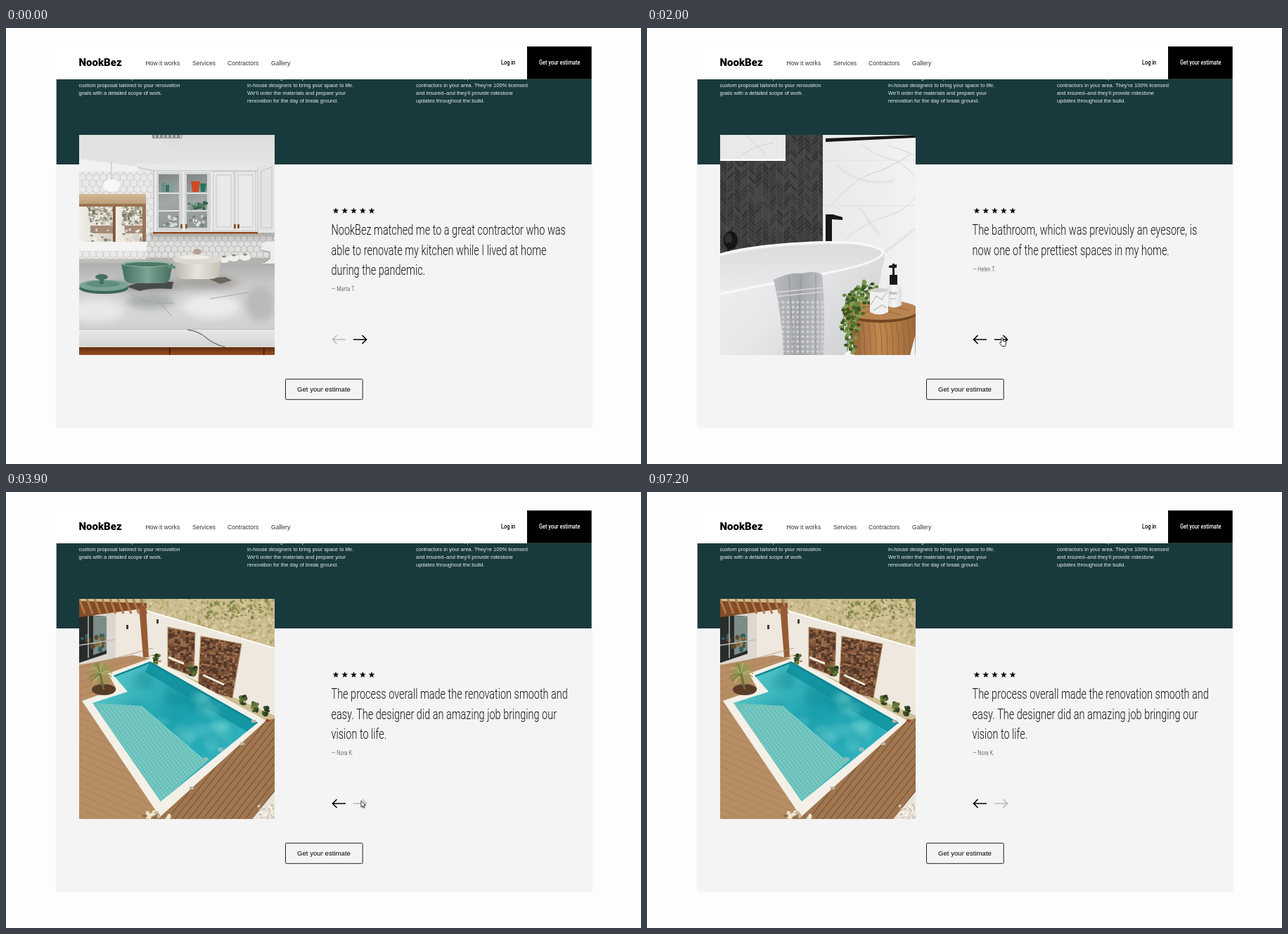
These frames come from a looping animation (903 by 620 pixels, 7.3 s). An HTML page with a canvas:

```html
<!DOCTYPE html>
<html lang="en">
<head>
<meta charset="utf-8">
<title>Testimonials</title>
<style>
html, body { margin: 0; width: 100%; height: 100%; overflow: hidden; background: #fdfdfd; }
canvas { display: block; }
</style>
</head>
<body>
<canvas id="stage" width="903" height="620"></canvas>
<script>
const stage = document.getElementById('stage');
const screen = stage.getContext('2d');
let ctx = screen;

const LOOP = 7300, STEP = 100;
const CLICKS = [1120, 2875], SLIDE = 500, SLIDE_FROM = 220;
const ENTER = { show: 100, start: 200, time: 450 };
const LEAVE = { start: 4700, time: 300 };
const PHOTO = { x: 104, y: 152, w: 278, h: 313 };
const SANS = '"Liberation Sans", Arial, sans-serif';
const NARROW = 'Roboto, "Open Sans", sans-serif';

const reviews = [
  { lines: ['NookBez matched me to a great contractor who was', 'able to renovate my kitchen while I lived at home', 'during the pandemic.'], by: '— Marta T.' },
  { lines: ['The bathroom, which was previously an eyesore, is', 'now one of the prettiest spaces in my home.'], by: '— Helen T.' },
  { lines: ['The process overall made the renovation smooth and', 'easy. The designer did an amazing job bringing our', 'vision to life.'], by: '— Nora K.' }
];

let seed = 1;
function rnd(a = 0, b = 1) {
  seed = (seed * 16807) % 2147483647;
  return a + (b - a) * seed / 2147483647;
}
function pick(list) { return list[Math.floor(rnd(0, list.length))]; }
function clamp(v) { return Math.max(0, Math.min(1, v)); }
function smooth(v) { return v * v * (3 - 2 * v); }

function box(color, x, y, w, h) {
  ctx.fillStyle = color;
  ctx.fillRect(x, y, w, h);
}
function shape(color, d) {
  ctx.fillStyle = color;
  ctx.fill(new Path2D(d));
}
function stroke(color, d, width = 1) {
  ctx.strokeStyle = color;
  ctx.lineWidth = width;
  ctx.stroke(new Path2D(d));
}
function oval(color, x, y, rx, ry = rx) {
  ctx.fillStyle = color;
  ctx.beginPath();
  ctx.ellipse(x, y, rx, ry, 0, 0, 7);
  ctx.fill();
}
function shade(x0, y0, x1, y1, ...colors) {
  const g = ctx.createLinearGradient(x0, y0, x1, y1);
  colors.forEach((c, i) => g.addColorStop(i / (colors.length - 1), c));
  return g;
}
function within(d, draw) {
  ctx.save();
  ctx.clip(new Path2D(d));
  draw();
  ctx.restore();
}
function blurred(radius, draw) {
  ctx.save();
  ctx.filter = `blur(${radius}px)`;
  draw();
  ctx.restore();
}
function specks(n, colors, x0, y0, x1, y1, size) {
  for (let i = 0; i < n; i++) oval(pick(colors), rnd(x0, x1), rnd(y0, y1), rnd(size / 2, size), rnd(size / 3, size));
}
function text(str, x, y, font, color, condense = 1) {
  ctx.save();
  ctx.translate(x, y);
  ctx.scale(condense, 1);
  ctx.font = font;
  ctx.fillStyle = color;
  ctx.fillText(str, 0, 0);
  ctx.restore();
}

function hexTiles(x0, y0, x1, y1, r, fill, line) {
  const w = r * Math.sqrt(3);
  within(`M${x0} ${y0}H${x1}V${y1}H${x0}Z`, () => {
    box(fill, x0, y0, x1 - x0, y1 - y0);
    for (let row = 0, y = y0; y < y1 + r; y += r * 1.5, row++)
      for (let x = x0 + (row % 2) * w / 2; x < x1 + w; x += w)
        stroke(line, `M${x} ${y - r}l${w / 2} ${r / 2}v${r}l${-w / 2} ${r / 2}l${-w / 2} ${-r / 2}v${-r}Z`, 0.7);
  });
}

function kitchen() {
  box('#ececea', 104, 152, 278, 313);
  box(shade(0, 152, 0, 205, '#dcdcdb', '#e8e8e7'), 104, 152, 278, 53);
  shape('#e2e2e0', 'M104 152H210L252 188L188 197L104 186Z');
  shape('#f1f1f0', 'M104 186L188 197V205H104Z');
  box('#8f908e', 208, 152, 42, 5);
  for (let x = 211; x < 250; x += 6) box('#cfd0ce', x, 152, 2, 4);
  hexTiles(104, 204, 210, 335, 5.6, '#e9e9e8', '#cbcccb');
  hexTiles(199, 291, 382, 330, 5.2, '#dfdfdd', '#b9bab8');
  box(shade(0, 291, 0, 306, 'rgba(110,100,92,.4)', 'rgba(110,100,92,0)'), 205, 291, 177, 15);

  oval('#f8f8f8', 150, 224, 12, 9);
  box('#cfcfce', 149, 190, 1.5, 26);
  box(shade(0, 236, 0, 251, '#d3b795', '#bb9c78'), 104, 236, 95, 15);
  box('#9c7350', 104, 250, 95, 56);
  [[104, 48], [156, 38]].forEach(([x, w]) => within(`M${x} 254h${w}v51h${-w}Z`, () => {
    box(shade(x, 0, x + w, 0, '#f1efe9', '#d4cec2'), x, 254, w, 51);
    specks(110, ['#8b8d76', '#6f735f', '#c9c5b6', '#f3f1ea', '#a79d8b'], x + w / 4, 252, x + w, 280, 2.4);
    box('#a88a78', x + w / 3, 281, w, 11);
    specks(24, ['#858b70', '#efece4', '#d7d1c4'], x + w / 4, 286, x + w, 304, 2.5);
  }));
  box('#7d5a3e', 152, 254, 3, 51);
  box('#f3f3f1', 104, 304, 96, 13);
  box(shade(0, 317, 0, 336, '#dad9d6', '#b7b5b1'), 104, 328, 100, 8);

  shape('#e9e9e9', 'M185 192L358 197V292H210V203L185 198Z');
  stroke('#bcbebe', 'M187 198L210 203H358', 1.2);
  box('#c9cbcb', 209, 203, 2, 89);
  [217, 257].forEach(x => {
    box('#d4d6d6', x - 3, 205, 37, 84);
    box(shade(x, 208, x + 30, 284, '#7f8685', '#a3a8a5', '#8c9390'), x, 208, 29, 76);
    [234, 259].forEach(y => box('#dfe1e0', x, y, 29, 2));
    specks(14, ['#c4c8c7', '#767f7d', '#dcdedd'], x + 4, 268, x + 26, 282, 3);
  });
  ['#5f918b', '#3f6f69', '#7aa09a'].forEach((c, i) => box(c, 221 + i * 6, 220 + i % 2 * 3, 5, 13 - i % 2 * 3));
  shape('#cf4a25', 'M263 218H276L274 233H265Z');
  shape('#23775f', 'M276 221H285L283 233H277Z');
  specks(24, ['#4d7a60', '#33624b', '#7d9c8a'], 260, 247, 284, 257, 3.4);
  [297, 328].forEach(x => {
    ctx.strokeStyle = '#c3c5c5';
    ctx.lineWidth = 1;
    ctx.strokeRect(x - 2, 204, 29, 84);
    ctx.strokeRect(x + 2, 209, 21, 74);
  });
  [248, 255, 324, 329].forEach(x => box('#8d5a32', x, 279, 3, 6));
  box('#8f4a22', 209, 290, 149, 2.5);
  shape('#e2e3e3', 'M358 198L382 190V290H358Z');
  stroke('#bfc2c2', 'M358 198V290M363 203L378 198V284H363Z');

  box('#b5b3af', 199, 327, 183, 9);
  [[324, 327], [340, 326], [310, 329]].forEach(([x, y]) => {
    oval('#f0eeea', x, y, 8, 5);
    oval('#8e8a84', x, y - 4, 3, 1.5);
  });
  shape('#ededec', 'M363 308Q367 302 382 304V335H364L374 328V318L364 316Z');
  stroke('#8f9090', 'M363 316L375 319V328L366 334', 1.2);

  box(shade(0, 335, 0, 428, '#aeaeae', '#cbcbcb', '#dadada', '#d0d0d0'), 104, 335, 278, 94);
  within('M104 335H382V428H104Z', () => blurred(6, () => {
    oval('#8f9492', 200, 366, 52, 8);
    oval('#9f9d99', 285, 362, 46, 8);
    oval('#a8adaa', 205, 388, 34, 11);
    oval('#e8e8e8', 128, 402, 40, 16);
    oval('#ececec', 292, 396, 40, 16);
    oval('#b9b9ba', 362, 392, 22, 26);
  }));
  shape('#6b675f', 'M286 356L312 354L321 359L305 364Z');
  shape('#484b4c', 'M172 368Q190 358 238 361L236 371Q205 369 190 374Z');
  shape(shade(238, 0, 306, 0, '#b9b3aa', '#e9e5de', '#c4beb4'), 'M238 331H306L303 351Q300 357 290 357H252Q242 357 241 350Z');
  oval('#dcd8d0', 272, 329, 35, 7);
  oval('#f0ede7', 268, 326, 22, 3);
  oval('#b09f8c', 272, 318, 6, 4);
  shape(shade(165, 0, 236, 0, '#426f62', '#7ca393', '#45705f'), 'M164 335H237L233 356Q231 363 222 363H179Q170 363 168 356Z');
  oval('#9bb8ab', 200, 335, 36, 5);
  oval('#4c7869', 200, 336, 32, 3);
  box('#5e8a7b', 231, 338, 10, 4);
  oval('#3b6758', 139, 370, 35, 8);
  oval('#7ba292', 139, 366, 35, 8);
  oval('#5f8c7c', 138, 364, 24, 4.5);
  oval('#45705f', 136, 354, 9, 4);
  box('#45705f', 133, 356, 6, 8);
  stroke('#a3a4a6', 'M178 379Q205 395 238 391M205 376L236 410M290 385L345 376', 1);

  box(shade(0, 428, 0, 455, '#e9e9e9', '#d3d3d2'), 104, 428, 278, 27);
  stroke('#bdbdbd', 'M104 428.5H382', 1);
  stroke('#7d7c7b', 'M258 429Q274 431 284 440T312 454', 1.6);
  box(shade(0, 454, 0, 465, '#5f2c10', '#9c4f1e'), 104, 454, 278, 11);
  [232, 366].forEach(x => box('#3b1d0c', x, 454, 1.5, 11));
}

function bathroom() {
  box('#38383a', 104, 152, 147, 170);
  within('M104 152H250V322H104Z', () => {
    for (let col = 0; col < 15; col++)
      for (let y = 136; y < 326; y += 6) {
        const x = 104 + col * 10, dir = col % 2 ? -10 : 10, top = col % 2 ? y + 10 : y;
        const tile = `M${x} ${top}l10 ${dir}v6l-10 ${-dir}Z`;
        shape(pick(['#343437', '#3d3d40', '#444446', '#3a3a3c']), tile);
        stroke('#58585a', tile, 0.5);
      }
  });
  box('#e8e9ea', 104, 152, 93, 37);
  stroke('#cdcfd1', 'M128 187Q145 169 180 163M140 152L170 181', 0.9);
  box('#fafafa', 104, 186, 93, 3);

  box(shade(250, 0, 382, 0, '#e8e9ea', '#f2f2f3'), 250, 152, 132, 250);
  stroke('#dadcdf', 'M250 188H382M250 253H382', 0.8);
  stroke('#d0d2d5', 'M305 166Q330 184 345 186T382 212M341 166L382 181M262 252Q294 215 320 207T376 179M282 300Q310 277 340 268T382 240', 1);
  blurred(1, () => stroke('#dcdee1', 'M270 195Q300 225 350 218M330 325L382 285M302 255L330 295', 2.5));
  shape('#171718', 'M254 157L382 152V156L254 162Z');

  oval('#151517', 119, 302, 10, 13);
  oval('#303033', 116, 300, 5, 8);
  box('#151517', 114, 305, 4, 15);
  shape('#161617', 'M254 265H264L278 269V273L263 272V306H254Z');

  shape(shade(104, 305, 290, 465, '#f0f0f1', '#e6e7e8', '#d0d2d4'), 'M104 321Q145 310 220 306Q315 300 336 318Q340 325 334 342Q328 398 280 465H104Z');
  shape(shade(0, 306, 0, 375, '#d9dbdc', '#ebebec'), 'M104 325Q170 309 250 308Q318 306 331 321Q315 338 240 349L104 374Z');
  stroke('#f9f9f9', 'M104 322Q145 310 220 306Q315 300 336 318Q336 334 242 351L104 378', 3);

  const towel = 'M180 358Q202 347 220 349Q240 344 249 351Q254 400 251 465H194Q193 416 180 358Z';
  shape(shade(182, 0, 252, 0, '#b8babd', '#a2a5a9', '#bfc1c4'), towel);
  within(towel, () => {
    for (let y = 390; y < 465; y += 7)
      for (let x = 184; x < 254; x += 7) shape('#d0d1d4', `M${x} ${y}l2.5 -2.5l2.5 2.5l-2.5 2.5Z`);
    stroke('#8d9095', 'M220 350Q213 410 218 465M202 353L209 465M240 350V465', 1);
    stroke('#d7d8da', 'M182 376L252 369M182 382L252 375', 1.5);
  });

  shape(shade(278, 0, 382, 0, '#8c5b31', '#bf8850', '#9e6a3a'), 'M279 402Q294 450 295 465H374L382 435V400Z');
  for (let x = 290; x < 382; x += 8) stroke('#875832', `M${x} 414Q${x + 5} 440 ${x + 4} 465`, 0.7);
  oval('#71451f', 332, 404, 54, 15);
  oval('#b78450', 332, 401, 54, 14);
  stroke('#8f5e31', 'M292 401Q330 389 372 401M300 406Q335 398 360 408', 0.8);

  shape(shade(340, 0, 362, 0, '#d7d8d8', '#f6f6f5', '#dededd'), 'M340 372Q342 366 347 364H356Q361 366 362 372V394Q351 401 340 394Z');
  box('#171718', 345, 351, 11, 14);
  box('#171718', 349, 335, 3, 16);
  shape('#171718', 'M344 338L355 336V341H344Z');
  text('Bath', 345, 379, '5px ' + SANS, '#777');
  text('wash', 345, 386, '4px ' + SANS, '#999');

  for (let s = 0; s < 8; s++) {
    const x = 323 - s * 5.5, top = 360 + Math.abs(s - 2) * 4, len = [26, 28, 30, 45, 66, 92, 84, 52][s];
    stroke('#42612d', `M${x} ${top}q-6 ${len / 2} -5 ${len}`, 1);
    for (let y = 0; y < len; y += 3) {
      oval(pick(['#45672b', '#67873c', '#7e9d51', '#385421']), x - 4 * y / len + rnd(-5, 5), top + y, 2.8, 2.2);
    }
  }
  shape('#f0f0ee', 'M317 373H343V404Q330 411 317 404Z');
  oval('#d0d0cd', 330, 373, 13, 3);
  stroke('#b6b6b5', 'M318 394L326 381L334 386L341 376M322 402L334 394L341 398', 1.1);
}

function pool() {
  box('#cdbd92', 104, 152, 278, 313);
  specks(600, ['#c2b27f', '#b5a873', '#ddcfa8', '#a6a165', '#d6c598'], 190, 152, 382, 215, 2.6);
  specks(70, ['#80874a', '#929654'], 285, 153, 382, 180, 2.6);
  shape('#eee8df', 'M150 166L200 168L382 222V318L207 240L150 238Z');
  stroke('#fffdf9', 'M200 169L382 222', 2);

  box('#dcd7d0', 104, 172, 52, 73);
  shape('#282c2b', 'M104 174L143 177V230L104 243Z');
  shape('#7d8c87', 'M124 176L143 177V225L124 232Z');
  specks(14, ['#8b6930', '#5d4a2f', '#316063'], 107, 204, 139, 230, 4);
  stroke('#c3bfb6', 'M117 174V236M104 218L155 210', 1.4);
  shape('#814d28', 'M104 155L200 158V165L104 178Z');
  for (let x = 104; x < 198; x += 11) stroke('#b5794a', `M${x} 152L${x + 8} 173`, 3);
  shape('#965b34', 'M189 162H199L203 235H195Z');
  [[171, 189], [214, 181]].forEach(([x, y]) => box('#443c35', x, y, 3, 6));

  const stones = (d, x0, y0, x1, y1) => {
    shape('#67442f', d);
    within(d, () => {
      for (let y = y0; y < y1; y += 3)
        for (let x = x0; x < x1; x += 4) box(pick(['#4b3328', '#7c5137', '#8f6343', '#664330', '#a3754f']), x, y + (x - x0) * .2, 3.6, 2.7);
    });
    stroke('#bb986d', d, 1);
  };
  stones('M230 192L269 200L267 263L230 248Z', 228, 180, 272, 266);
  stones('M277 205L335 216L322 293L273 280Z', 270, 188, 338, 296);
  stroke('#f9eee0', 'M231 235L253 244M280 260L310 274', 3);

  shape('#b78d64', 'M104 246L180 232L222 240L146 300L219 461V465H104Z');
  for (let i = 0; i < 24; i++) stroke('#a57c56', `M104 ${250 + i * 10}l105 ${i < 5 ? -28 : 45}`, 0.7);
  shape('#a0764f', 'M219 461L366 326L382 322V465H215Z');
  within('M222 462L368 327L382 322V465H222Z', () => {
    for (let i = 0; i < 26; i++) stroke('#65452d', `M${190 + i * 10} 465L${320 + i * 10} 300`, 1);
  });
  shape('#eae4d8', 'M350 465L382 426V465Z');
  specks(50, ['#d3cabd', '#fffaf0', '#bfb6a8'], 358, 445, 382, 465, 1.6);

  shape('#f4f0e7', 'M145 258L207 236L370 325L219 462L108 297L157 280Z');
  const water = 'M153 261L205 241L358 328L220 440L123 300L173 284Z';
  shape(shade(160, 245, 310, 390, '#55c6c8', '#1aa0ad', '#2fb3bd'), water);
  within(water, () => {
    shape('#1596a3', 'M205 241L358 328L345 342L198 256Z');
    blurred(3, () => specks(28, ['rgba(137,218,218,.25)', 'rgba(12,128,142,.2)'], 180, 260, 320, 365, 18));
    const shallow = 'M123 300L192 304L285 384L220 440Z';
    shape('#66bfb9', shallow);
    within(shallow, () => {
      for (let i = -20; i < 40; i++) stroke('rgba(206,239,229,.5)', `M${110 + i * 6} 290l120 165M${100 + i * 6} 450l170 -150`, 0.6);
    });
    stroke('#8fd6d2', 'M192 304L285 384', 1);
    stroke('#128593', 'M153 261L205 241L358 328', 5);
  });
  [[284, 380], [305, 366]].forEach(([x, y]) => oval('#86bdbb', x, y, 4, 3));
  [[264, 421], [336, 358], [352, 326]].forEach(([x, y]) => box('#b9b3a8', x - 3, y - 2, 6, 4));

  oval('#573d28', 139, 281, 17, 8);
  for (let a = 0; a < 20; a++) {
    const dx = Math.cos(a * .32 + 3) * 17, dy = Math.sin(a * .32 + 3) * 15;
    stroke(pick(['#6b843a', '#8d9c55', '#b0ae6c']), `M134 260q${dx * .6} ${dy - 8} ${dx} ${dy}`, 1.6);
  }
  stroke('#806345', 'M134 258L139 281', 2.5);
  [[214, 236], [266, 253], [337, 295], [354, 306], [369, 311]].forEach(([x, y]) =>
    specks(16, ['#3f5428', '#627434', '#293b20'], x - 4, y - 7, x + 4, y + 7, 3));
  specks(18, ['#c9b797', '#f0e4ce', '#8b7351'], 194, 456, 233, 465, 4);
  oval('#9e3f2d', 372, 325, 3, 2);
}

function photo(draw, start) {
  const canvas = document.createElement('canvas');
  canvas.width = PHOTO.w;
  canvas.height = PHOTO.h;
  ctx = canvas.getContext('2d');
  ctx.translate(-PHOTO.x, -PHOTO.y);
  seed = start;
  draw();
  ctx = screen;
  return canvas;
}
const photos = [kitchen, bathroom, pool].map((draw, i) => photo(draw, 4711 + i * 97));

function star(x, y) {
  let d = '';
  for (let i = 0; i < 10; i++) {
    const r = i % 2 ? 1.9 : 4.7, a = i * Math.PI / 5 - Math.PI / 2;
    d += `${i ? 'L' : 'M'}${x + r * Math.cos(a)} ${y + r * Math.sin(a)}`;
  }
  shape('#000', d + 'Z');
}

function review({ lines, by }, dx, alpha) {
  ctx.save();
  ctx.beginPath();
  ctx.rect(461, 245, 371.5, 150);
  ctx.clip();
  ctx.globalAlpha = alpha;
  ctx.translate(dx, 0);
  for (let i = 0; i < 5; i++) star(469 + i * 12.75, 260);
  lines.forEach((line, i) => text(line, 462.5, 294 + i * 28.6, '300 20px ' + NARROW, '#111', 0.724));
  text(by, 463, 288.5 + lines.length * 28.6, '300 9.5px ' + NARROW, '#333', 0.76);
  ctx.restore();
}

function page() {
  box('#fdfdfd', 0, 0, 903, 620);
  ctx.save();
  ctx.shadowColor = 'rgba(0,0,0,.06)';
  ctx.shadowBlur = 4;
  ctx.shadowOffsetY = 1;
  box('#f4f4f5', 71.7, 73, 761, 494);
  ctx.restore();
  box('#193a3d', 71.7, 73, 761, 121);

  const columns = [
    [103.5, 'Our team will create a plan,', 'custom proposal tailored to your renovation', 'goals with a detailed scope of work.'],
    [343, 'There we assign friendly', 'in-house designers to bring your space to life.', 'We’ll order the materials and prepare your', 'renovation for the day of break ground.'],
    [583, 'We’ll match a full set, picked', 'contractors in your area. They’re 100% licensed', 'and insured–and they’ll provide milestone', 'updates throughout the build.']
  ];
  columns.forEach(([x, ...lines]) =>
    lines.forEach((line, i) => text(line, x, 73 + i * 11.1, '7.5px ' + SANS, '#e9eeee')));

  box('#fff', 71.7, 26, 761, 47);
  box('#000', 741, 26.3, 91.7, 46.5);
  text('NookBez', 103.5, 54, '900 15px ' + NARROW, '#000');
  [['How it works', 198.5], ['Services', 265], ['Contractors', 315], ['Gallery', 377]].forEach(([label, x]) =>
    text(label, x, 52.7, '8.6px ' + SANS, '#333'));
  text('Log in', 704, 52.3, '500 9px ' + NARROW, '#000', 0.82);
  text('Get your estimate', 758, 52.3, '500 9px ' + NARROW, '#fff', 0.82);

  ctx.strokeStyle = '#222';
  ctx.lineWidth = 1;
  ctx.beginPath();
  ctx.roundRect(397.5, 499.3, 109.7, 29, 1.5);
  ctx.stroke();
  text('Get your estimate', 414, 517.3, '9.65px ' + SANS, '#000');
}

function cursor(t, disabled) {
  if (t < ENTER.show || t >= LEAVE.start + LEAVE.time) return;
  const away = 1 - smooth(clamp((t - ENTER.start) / ENTER.time));
  const leave = smooth(clamp((t - LEAVE.start) / LEAVE.time));
  const far = away + leave;
  ctx.save();
  ctx.translate(505 + 45 * far, 440 + 172 * far);
  ctx.lineJoin = 'round';
  const hand = far < 0.05 && !disabled;
  const d = hand
    ? 'M-1.2 1Q0 -.5 1 1V5L4.8 5.8Q5.8 6.2 5.6 8L4.6 12.5H-.2L-3.2 8.5Q-3.8 7 -2.4 6.8L-1.2 7.6Z'
    : 'M0 -1V8.2L2.1 6.3L3.5 9.4L5 8.7L3.7 5.8H6.5Z';
  shape('#fff', d);
  stroke('#222', d, 0.9);
  ctx.restore();
}

function render(t) {
  const current = CLICKS.filter(c => t >= c).length;
  const p = current ? clamp((t - CLICKS[current - 1]) / SLIDE) : 1;
  const shown = 1 - (1 - p) ** 3;

  page();
  if (shown < 1) {
    ctx.drawImage(photos[current - 1], PHOTO.x, PHOTO.y);
    review(reviews[current - 1], 0, 1 - shown);
  }
  ctx.globalAlpha = shown;
  ctx.drawImage(photos[current], PHOTO.x, PHOTO.y);
  ctx.globalAlpha = 1;
  review(reviews[current], SLIDE_FROM * (1 - shown), shown);

  const last = current === reviews.length - 1;
  stroke(current ? '#000' : '#b9b9bd', 'M483 443H465M470.5 437L464.5 443L470.5 449', 1.6);
  stroke(last ? '#b9b9bd' : '#000', 'M494 443H512M506.5 437L512.5 443L506.5 449', 1.6);
  cursor(t, last);
}

const begin = performance.now();
function tick() {
  const t = (performance.now() - begin) % LOOP;
  render(Math.floor(t / STEP) * STEP);
  requestAnimationFrame(tick);
}
tick();
</script>
</body>
</html>
```
